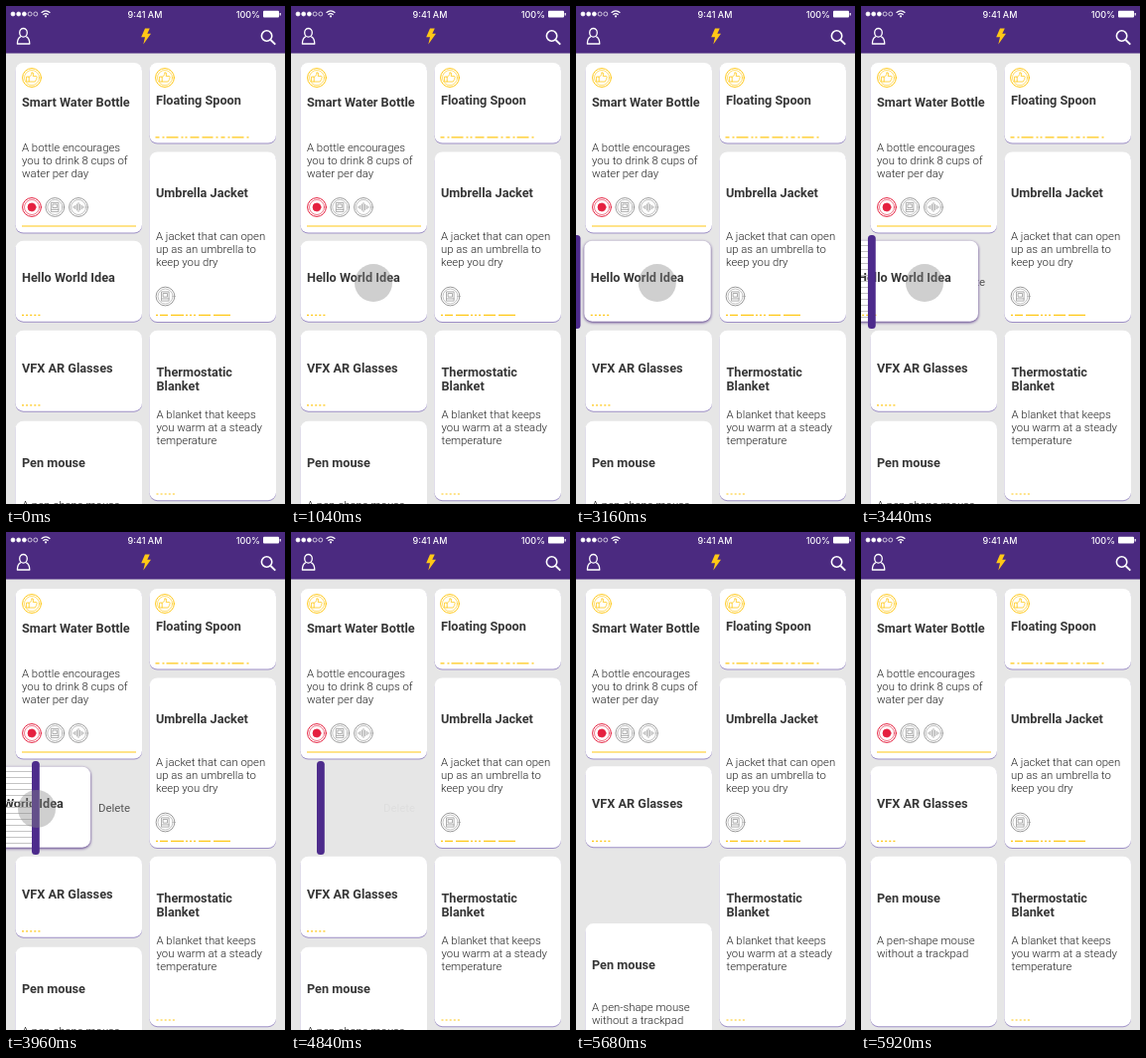
Write an HTML page that moves like this. It is 281 by 500 pixels and loops after 6.72 s.

```html
<!DOCTYPE html>
<html lang="en">
<head>
<meta charset="utf-8">
<title>Idea cards</title>
<style>
  html, body { margin: 0; height: 100%; overflow: hidden; background: #e6e6e6; }
  svg { display: block; width: 100vw; height: 100vh; }
  text { font-family: Roboto, sans-serif; }
  .title { font-size: 12.7px; font-weight: 600; fill: #363636; }
  .body { font-size: 11.35px; font-weight: 300; fill: #222; }
  .status { font: 500 9px Inter, sans-serif; fill: #fff; }
  .card { filter: drop-shadow(0 1.4px .4px #9d8fc6); }
  .icon { fill: none; stroke-width: 1; stroke-linejoin: round; stroke-linecap: round; }
  .line { fill: none; stroke: #ffc816; stroke-width: 1.2; }
</style>
</head>
<body>
<svg id="stage" viewBox="0 0 281 500"></svg>
<script>
const PURPLE = '#4b2a80', YELLOW = '#ffc816', RED = '#e5203f', GREY = '#9b9b9b';

const lines = (cls, x, y, step, rows) =>
  rows.map((row, i) => `<text class="${cls}" x="${x}" y="${y + i * step}">${row}</text>`).join('');

const GLYPHS = {
  thumb: '<path d="M-5-1h2.2v5h-2.2zM-2.8-.6L-.2-3.2V-5.2q1.8-.4 1.8 1.5L1.2-1.6H4.6Q5.6-1 4.8.4Q5 1.6 4.2 2.2Q4 3.8 3 4H-2.8"/>',
  book: '<path d="M-3.6-4.6H3.6V4.6H-3.6zM-3.6 2.4H3.6M-2-3H2V.6H-2z"/>',
  wave: '<path d="M-5-.6V.6M-3.3-1.6V1.6M-1.6-3V3M0-4.4V4.4M1.6-2.8V2.8M3.3-1.8V1.8M5-.6V.6"/>',
  disc: `<circle r="4" fill="${RED}"/>`
};
const badge = (x, y, glyph, color) =>
  `<g class="icon" stroke="${color}" transform="translate(${x} ${y})"><circle r="9.4"/>
   <circle r="7.5" stroke-width=".6"/><g stroke-width=".8">${GLYPHS[glyph]}</g></g>`;

const progress = (x, y, length, dashes = 'none') =>
  `<path class="line" d="M${x} ${y}h${length}" stroke-dasharray="${dashes}"/>`;
const dots = (x, y) => progress(x, y, 18.5, '2 2.1');

const card = (id, x, y, height, content) =>
  `<g id="${id}"><rect class="card" x="${x}" y="${y}" width="127.5" height="${height}" rx="8" fill="#fff"/>${content}</g>`;

const header = `
  <rect width="281" height="47.5" fill="${PURPLE}"/>
  ${[7, 13, 19, 25, 31].map((x, i) =>
    `<circle cx="${x - 0.3 * i}" cy="8" r="2" fill="${i < 3 ? '#fff' : 'none'}" stroke="#fff" stroke-width=".7"/>`).join('')}
  <g fill="none" stroke="#fff" stroke-width="1.3">
    <path d="M35.6 6.7Q40 3 44.4 6.7M37.4 8.7Q40 6.5 42.6 8.7"/><path d="M39 10.4h2" stroke-width="1.8"/>
  </g>
  <text class="status" x="140" y="11.5" text-anchor="middle">9:41 AM</text>
  <text class="status" x="256" y="11.5" text-anchor="end">100%</text>
  <rect x="259" y="4.8" width="16" height="6.8" rx="1" fill="#fff"/>
  <path d="M276.2 7v2.4" stroke="#fff" stroke-width="1.2"/>
  <g fill="none" stroke="#fff" stroke-width="1.3" stroke-linejoin="round">
    <ellipse cx="17.5" cy="26.8" rx="3.8" ry="4.3"/>
    <path d="M14.8 30.6Q11.4 32.4 11.4 38H23.8Q23.8 32.4 20.3 30.6"/>
    <circle cx="262.6" cy="30" r="5.2" stroke-width="1.6"/>
    <path d="M266.5 34L271.3 38.6" stroke-width="1.9"/>
  </g>
  <path d="M140 22.5H144.8L142.3 27.8H146L138.3 38.5L140 31.2H136.2z" fill="${YELLOW}"/>`;

const slats = Array.from({ length: 13 }, (_, i) => `M0 ${240.5 + i * 6}H140`).join('');

document.getElementById('stage').innerHTML = `
  <rect width="281" height="500" fill="#e6e6e6"/>
  <text id="remove" x="93" y="281" font-size="11.4" fill="#555">Delete</text>
  ${card('bottle', 9.5, 57, 170.5,
    badge(26, 72, 'thumb', YELLOW) + lines('title', 16, 101, 14, ['Smart Water Bottle']) +
    lines('body', 16, 145.5, 13.2, ['A bottle encourages', 'you to drink 8 cups of', 'water per day']) +
    badge(26, 202, 'disc', RED) + badge(49.3, 202, 'book', GREY) + badge(73, 202, 'wave', GREY) +
    progress(16, 221, 115))}
  ${card('spoon', 144.5, 57, 80.5,
    badge(160, 72, 'thumb', YELLOW) + lines('title', 151, 99, 14, ['Floating Spoon']) +
    progress(150.5, 131.8, 95.5, '4 3 2 2 12 3 2 2 2 3 9 3 11 3 2 3'))}
  ${card('jacket', 144.5, 146.5, 170.5,
    lines('title', 151, 192.3, 14, ['Umbrella Jacket']) +
    lines('body', 151, 234.5, 13.2, ['A jacket that can open', 'up as an umbrella to', 'keep you dry']) +
    badge(160.5, 291.5, 'book', GREY) + progress(151, 310.3, 75, '2 2 8 3 13 2 2 2 2 2 2 3 12 3 17 2'))}
  ${card('blanket', 144.5, 325.7, 170.5,
    lines('title', 151.5, 371.5, 14.7, ['Thermostatic', 'Blanket']) +
    lines('body', 151.5, 413.5, 13.2, ['A blanket that keeps', 'you warm at a steady', 'temperature']) + dots(151.5, 490))}
  ${card('glasses', 9.5, 325.7, 81, lines('title', 16, 367.7, 14, ['VFX AR Glasses']) + dots(16, 400.8))}
  ${card('mouse', 9.5, 416.7, 170.5,
    lines('title', 16, 462.7, 14, ['Pen mouse']) +
    lines('body', 16, 504.5, 13.2, ['A pen-shape mouse', 'without a trackpad']))}
  ${card('hello', 9.5, 235.7, 81, lines('title', 16, 277.2, 14, ['Hello World Idea']) + dots(16, 310.3))}
  <clipPath id="shredded"><rect id="cut" y="236" height="81"/></clipPath>
  <path d="${slats}" stroke="#c4c4c4" stroke-width="1" clip-path="url(#shredded)"/>
  <rect id="bar" x="-4" y="230" width="7.8" height="94" rx="3.5" fill="#4d2b8c"/>
  <circle id="touch" cx="83" cy="278" r="19" fill="#888"/>
  ${header}`;

const $ = id => document.getElementById(id);
const LOOP = 6720, STEP = 40;
const helloShape = $('hello').querySelector('.card');

function draw(time) {
  const t = Math.floor(time / STEP) * STEP;
  const ease = (start, end) => {
    const p = Math.min(1, Math.max(0, (t - start) / (end - start)));
    return p * p * (3 - 2 * p);
  };
  const move = (id, x, y) => $(id).setAttribute('transform', `translate(${x} ${y})`);

  const drag = ease(3080, 3960), exit = ease(4440, 4840), lift = ease(1680, 1920);
  const helloX = -52 * drag - 94 * exit;
  const barX = -4 + 4 * ease(2320, 2560) + 30 * drag - 35 * ease(5040, 5200);

  move('hello', helloX, 0);
  helloShape.style.filter = lift
    ? `drop-shadow(0 ${1.4 - 0.4 * lift}px ${0.4 + 1.2 * lift}px rgb(${157 - 82 * lift},${143 - 101 * lift},${198 - 70 * lift}))`
    : '';
  $('cut').setAttribute('width', Math.max(0, Math.min(barX, 137 + helloX)));
  move('bar', barX, 0);
  move('touch', -52 * drag, 0);
  $('touch').setAttribute('opacity', 0.4 * ease(840, 1040) * (1 - ease(4440, 4640)));
  $('remove').setAttribute('opacity', t < 5080 ? 1 - 0.95 * exit : 0);
  move('glasses', 0, -90.5 * ease(5160, 5520));
  move('mouse', 0, -91 * ease(5560, 5920));
}

const begin = performance.now();
function tick() {
  draw((performance.now() - begin) % LOOP);
  requestAnimationFrame(tick);
}
tick();
</script>
</body>
</html>
```
